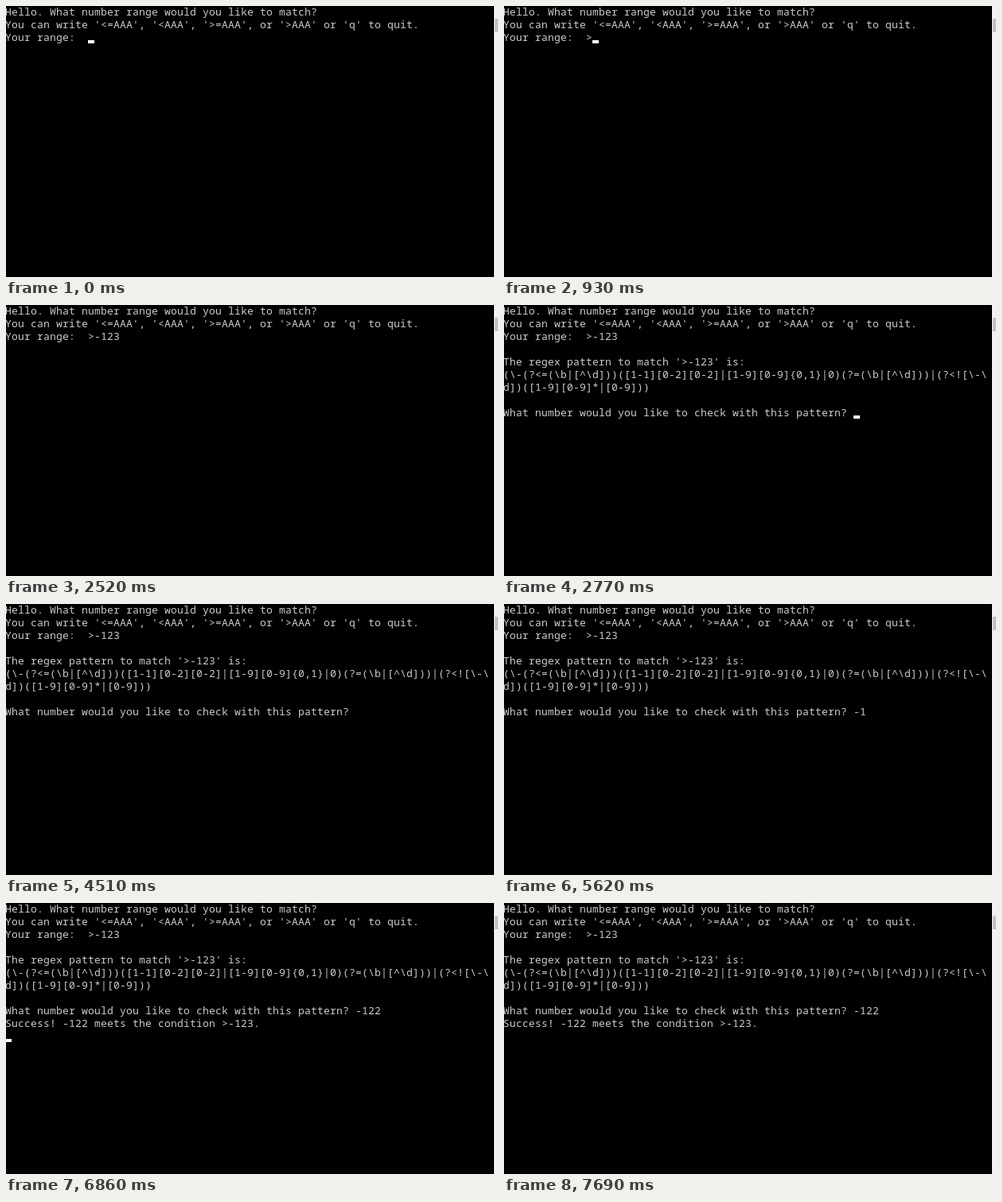
An HTML page with a canvas for the animation above (8 s loop, 618 px wide and 341 px high).

```html
<!DOCTYPE html>
<html lang="en">
<head>
<meta charset="utf-8">
<title>Number range console</title>
<style>
  html, body { margin: 0; width: 100%; height: 100%; overflow: hidden; background: #000; }
  canvas { display: block; }
</style>
</head>
<body>
<canvas id="screen" width="618" height="341"></canvas>
<script>
const canvas = document.getElementById('screen');
const ctx = canvas.getContext('2d', { alpha: false });
const LOOP = 8000;
const CELL_W = 8, CELL_H = 16, LEFT = -1, TOP = -1, BASELINE = 13;
const COLUMNS = 76;

const INTRO = `Hello. What number range would you like to match?
You can write '<=AAA', '<AAA', '>=AAA', or '>AAA' or 'q' to quit.
Your range:  `;

const PATTERN = String.raw`

The regex pattern to match '>-123' is:
(\-(?<=(\b|[^\d]))([1-1][0-2][0-2]|[1-9][0-9]{0,1}|0)(?=(\b|[^\d]))|(?<![\-\d])([1-9][0-9]*|[0-9]))

What number would you like to check with this pattern? `;

const RESULT = `
Success! -122 meets the condition >-123.
`;

// The session: printed blocks appear at once, typed text one key at a time.
const SESSION = [
  print(0, INTRO),
  type('>-123', [340, 1050, 1420, 1910, 2030]),
  print(2770, PATTERN),
  type('-122', [5250, 5620, 5870, 6110]),
  print(6860, RESULT)
];

// The cursor starts visible and toggles at each of these moments.
const BLINKS = [340, 930, 1420, 1790, 2520, 2770, 3530, 4020, 4510, 5130, 5620, 5870, 6110, 6610, 7690];

function print(at, text) {
  return t => t >= at ? text : '';
}

function type(text, keys) {
  return t => text.slice(0, countPassed(keys, t));
}

function countPassed(times, t) {
  return times.filter(time => time <= t).length;
}

function wrap(line) {
  const rows = [line.slice(0, COLUMNS)];
  for (let i = COLUMNS; i < line.length; i += COLUMNS) rows.push(line.slice(i, i + COLUMNS));
  return rows;
}

function rect(color, x, y, w, h) {
  ctx.fillStyle = color;
  ctx.fillRect(x, y, w, h);
}

function drawRow(text, row) {
  const y = TOP + row * CELL_H + BASELINE;
  [...text].forEach((ch, col) => ctx.fillText(ch, LEFT + col * CELL_W, y));
}

function drawCursor(rows) {
  const x = LEFT + rows.at(-1).length * CELL_W;
  const bottom = TOP + rows.length * CELL_H;
  rect('#fff', x, bottom - 4, CELL_W, 4);
}

function drawScrollbar() {
  rect('#fff', 613, 0, 1, canvas.height);
  rect('#f0f0f0', 614, 0, 4, canvas.height);
  rect('#c0c0c0', 614, 16, 4, 17);
}

function draw(t) {
  const output = SESSION.map(part => part(t)).join('');
  const rows = output.split('\n').flatMap(wrap);

  rect('#000', 0, 0, canvas.width, canvas.height);
  ctx.fillStyle = '#ccc';
  ctx.font = '13px "Noto Sans Mono", "DejaVu Sans Mono", monospace';
  rows.forEach(drawRow);
  if (countPassed(BLINKS, t) % 2 === 0) drawCursor(rows);
  drawScrollbar();
}

const start = performance.now();
function tick() {
  draw((performance.now() - start) % LOOP);
  requestAnimationFrame(tick);
}
tick();
</script>
</body>
</html>
```
